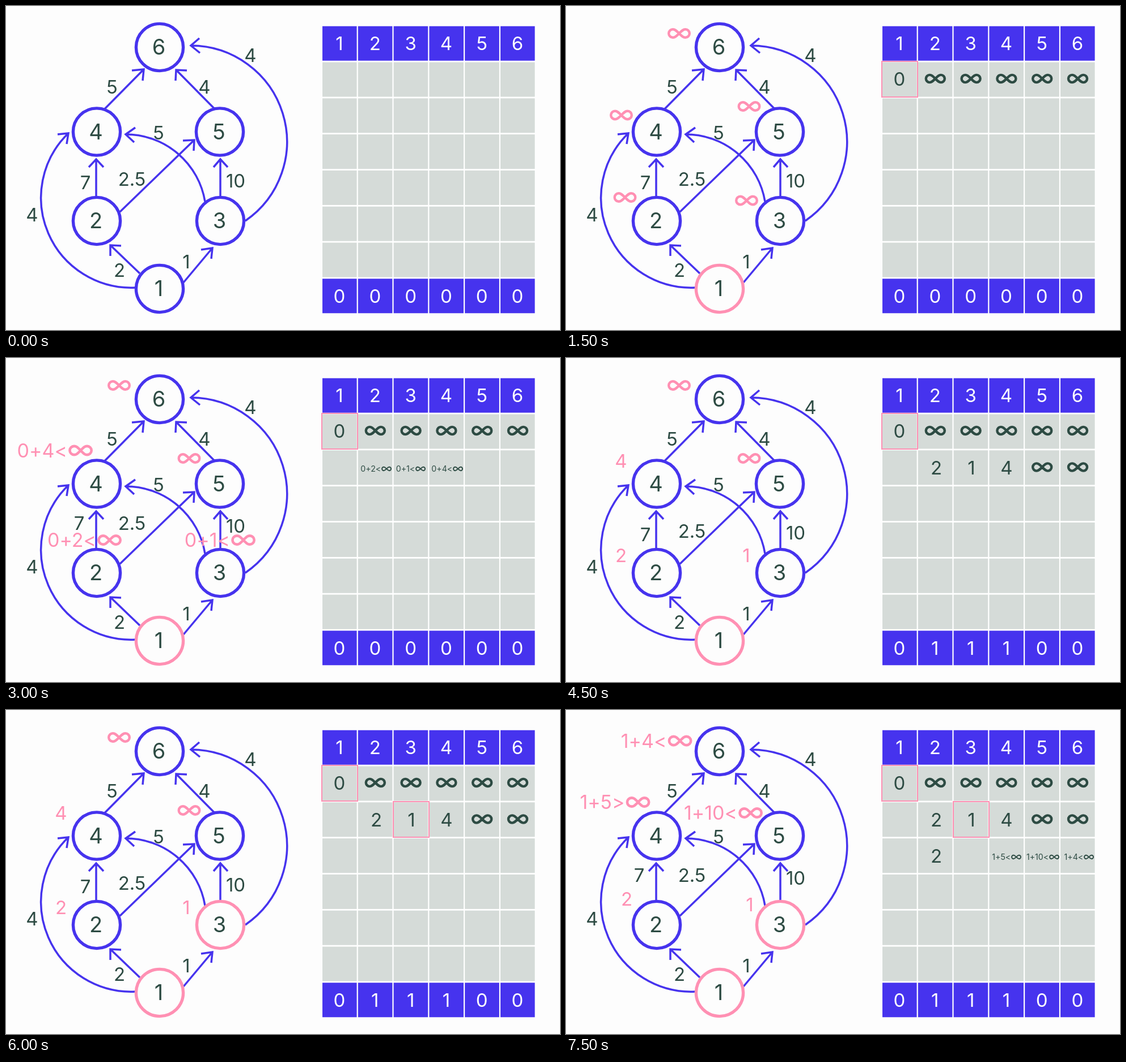
Animation, 977 px wide and 573 px high, one loop 8000 ms. Source, as an HTML page:

```html
<!DOCTYPE html>
<html lang="en">
<head>
<meta charset="utf-8">
<title>Shortest paths step by step</title>
<style>
  html, body { margin: 0; width: 100%; height: 100%; overflow: hidden; background: #fdfdfd; }
  svg { display: block; width: 100%; height: 100%; }
  text { font-family: Inter, Roboto, sans-serif; font-variant-ligatures: none; }
</style>
</head>
<body>
<svg id="stage" viewBox="0 0 977 573"></svg>
<script>
const BLUE = '#4633ee', PINK = '#ff90b3', DARK = '#2d4b43', GREY = '#d5dbd8', PAPER = '#fdfdfd';
const STEP = 1500, LOOP = 8000;

// Graph: node centres, and edges as a path plus its arrow head
const nodes = { 1: [271, 500], 2: [160, 380], 3: [378, 380], 4: [160, 222.5], 5: [377, 222.5], 6: [271, 73] };
const edges = [
  'M174 182L243 112M222 114L243 112L241 132',
  'M367 181L300 113M299 132L300 113L319 114',
  'M159 337V271M146 285L159 271L172 285',
  'M378 337V271M366 285L378 271L391 285',
  'M201 364L332 237M312 238L332 237L331 256',
  'M236 473L184 423M184 442L184 423L203 424',
  'M313 489L364 428M344 431L364 428L362 447',
  'M228 498A159 159 0 0 1 110 225M91 227L110 225L107 244',
  'M351 346A142 142 0 0 0 211 227M228 215L211 227L226 241',
  'M422 380A170 170 0 0 0 326 70M341 57L326 70L342 83'
];
const fixedWeights = [[5, 187, 143], [4, 350, 143], [4, 431, 87], [5, 269, 224], [4, 46, 369], [2, 200, 467], [1, 318, 452]];
const looseWeights = [[7, 140, 312], ['2.5', 222, 306], [10, 405, 309]];
const raisedWeights = [[7, 129, 292], ['2.5', 222, 292], [10, 405, 297]];

// Table geometry
const cellX = column => 558 + 62.8 * column;
const cellY = row => 35.7 + 63.8 * row;
const middleX = column => cellX(column) + 30;

function label(value, x, y, color = DARK, size = 33, anchor = 'middle') {
  const safe = String(value).replace('<', '&lt;');
  return `<text x="${x}" y="${y + size * 0.364}" fill="${color}" font-size="${size}" text-anchor="${anchor}">${safe}</text>`;
}

function infinity(x, y, color = PINK, width = 41, weight = 4.4) {
  return `<path transform="translate(${x} ${y}) scale(${width / 41})" fill="none" stroke="${color}" stroke-width="${weight}"
    d="M0 0C5 -5 7 -7.3 11 -7.3A7.3 7.3 0 0 1 11 7.3C7 7.3 5 5 0 0C-5 -5 -7 -7.3 -11 -7.3A7.3 7.3 0 0 0 -11 7.3C-7 7.3 -5 5 0 0Z"/>`;
}

// A sum compared with infinity, aligned to its right edge
function compare(sum, right, y, color = PINK, size = 34) {
  const width = size * 1.26;
  return label(sum, right - width * 1.05, y, color, size, 'end') + infinity(right - width / 2, y, color, width);
}
const smallCompare = (sum, right, y) => compare(sum, right, y, DARK, 14.2);

const mark = (value, x, y) => value === '∞' ? infinity(x, y) : label(value, x, y, PINK);
const darkInfinity = (column, y) => infinity(middleX(column) + 0.5, y, DARK, 37, 4.9);
const outline = (x, y) => `<rect x="${x}" y="${y}" width="63" height="63" fill="none" stroke="${PINK}" stroke-width="2"/>`;
const each = (list, draw) => list.map(item => draw(...item)).join('');

function graph(visited, weights) {
  const circles = Object.entries(nodes).map(([name, [x, y]]) =>
    `<circle cx="${x}" cy="${y}" r="41.6" fill="${PAPER}" stroke="${visited.includes(+name) ? PINK : BLUE}" stroke-width="5.4"/>`
    + label(name, x - 1.5, y - 0.5, DARK, 38)).join('');
  return `<path d="${edges.join('')}" fill="none" stroke="${BLUE}" stroke-width="3.5"/>`
    + circles + each([...fixedWeights, ...weights], label);
}

function table(flags) {
  let out = '<rect x="557" y="35" width="377" height="509" fill="#fff"/>';
  for (let row = 0; row < 8; row++) {
    for (let column = 0; column < 6; column++) {
      const edge = row === 0 || row === 7;
      out += `<rect x="${cellX(column)}" y="${cellY(row)}" width="60.6" height="61" fill="${edge ? BLUE : GREY}"/>`;
    }
  }
  for (let column = 0; column < 6; column++) {
    out += label(column + 1, middleX(column), 65.5, '#fff') + label(flags[column], middleX(column), 512.5, '#fff');
  }
  return out;
}

function firstRow() {
  return outline(557, 98) + label(0, 588, 128.5) + [1, 2, 3, 4, 5].map(c => darkInfinity(c, 128.5)).join('');
}

function secondRow() {
  return each([[2, 653, 194], [1, 715, 194], [4, 777, 194]], label) + darkInfinity(4, 193) + darkInfinity(5, 193);
}

function scene(step) {
  const visited = [[], [1], [1], [1], [1, 3], [1, 3]][step];
  const raised = step === 2 || step === 5;
  let out = graph(visited, raised ? raisedWeights : looseWeights) + table(step < 3 ? '000000' : '011100');
  if (step > 0) out += firstRow();
  if (step > 0 && step < 5) out += infinity(199.5, 48.5) + infinity(323, 177.5);
  if (step > 2) out += secondRow();
  if (step > 3) out += outline(683, 162);

  if (step === 1) out += each([['∞', 97.5, 193], ['∞', 104, 338.5], ['∞', 318.5, 344]], mark);
  if (step === 2) {
    out += each([['0+4<', 153, 163.5], ['0+2<', 204, 322], ['0+1<', 440, 322]], compare)
      + each([['0+2<', 680, 196], ['0+1<', 740, 196], ['0+4<', 806, 196]], smallCompare);
  }
  if (step === 3 || step === 4) out += each([[4, 97, 182], [2, 97, 349], [1, 318, 349]], mark);
  if (step === 5) {
    out += each([['1+4<', 222.5, 54.5], ['1+5>', 148.5, 163], ['1+10<', 347, 182]], compare)
      + each([[2, 107, 334], [1, 324, 344]], mark)
      + label(2, 653, 258)
      + each([['1+5<', 803, 260], ['1+10<', 870, 260], ['1+4<', 931, 260]], smallCompare);
  }
  return out;
}

const stage = document.getElementById('stage');
const start = performance.now();
let shown = -1;

function tick() {
  const step = Math.floor((performance.now() - start) % LOOP / STEP);
  if (step !== shown) {
    stage.innerHTML = scene(step);
    shown = step;
  }
  requestAnimationFrame(tick);
}
tick();
</script>
</body>
</html>
```
